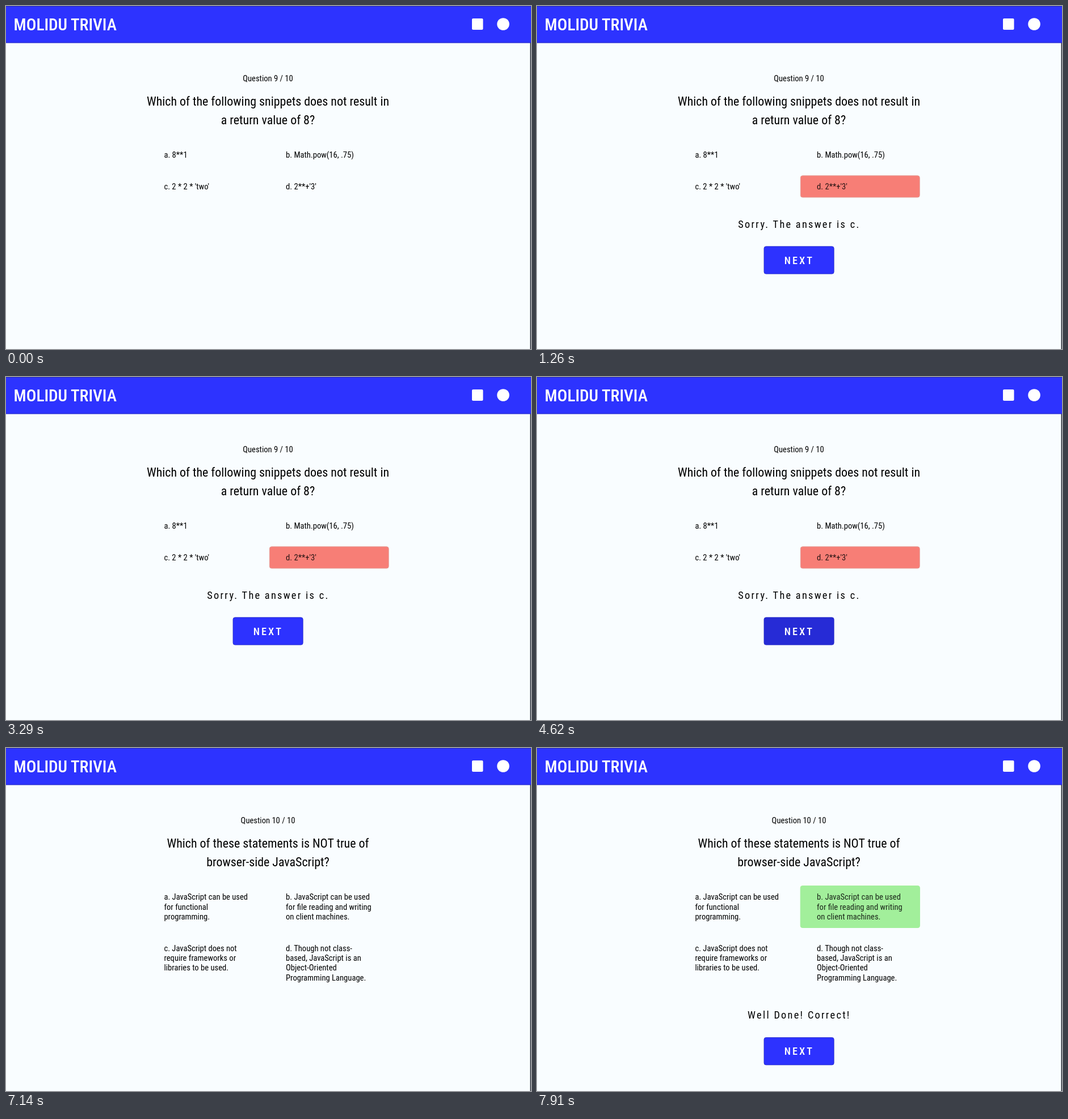
Animation of 925x606 px, one loop 8 s. Source, as an HTML page:

```html
<!DOCTYPE html>
<html lang="en">
<head>
<meta charset="utf-8">
<title>Trivia quiz</title>
<style>
  html, body { margin: 0; width: 100%; height: 100%; overflow: hidden; background: #f9fdff; }
  svg { display: block; width: 100vw; height: 100vh; }
  text { font-family: "Roboto Condensed", Roboto, sans-serif; font-stretch: 75%; white-space: pre; }
</style>
</head>
<body>
<svg id="stage" viewBox="0 0 925 606" xmlns="http://www.w3.org/2000/svg"></svg>
<script>
const LOOP = 8000;
const REM = 14.62;
const LINE = 17.36;
const CENTER = 461.5;
const COLUMNS = [278.4, 493];
const BLUE = [45, 50, 255];
const BLUE_HOVER = [38, 43, 214];
const stage = document.getElementById('stage');

function add(parent, tag, attrs) {
  const node = document.createElementNS('http://www.w3.org/2000/svg', tag);
  for (const key in attrs) node.setAttribute(key, attrs[key]);
  parent.appendChild(node);
  return node;
}

// Condense regular Roboto only where no condensed face is available.
function findSqueeze() {
  const sample = 'Which of the following snippets';
  const measure = style => {
    const node = add(stage, 'text', { 'font-size': 100, style });
    node.textContent = sample;
    const width = node.getComputedTextLength();
    node.remove();
    return width;
  };
  const wide = measure('font-family: Roboto, sans-serif; font-stretch: 100%');
  const k = 0.89 * wide / measure('');
  return k > 0.95 ? 1 : k;
}
const squeeze = findSqueeze();

function label(parent, str, x, y, size, opts = {}) {
  const node = add(parent, 'text', {
    transform: `translate(${x} ${y}) scale(${squeeze} 1)`,
    'font-size': size,
    'font-weight': opts.weight || 400,
    'text-anchor': opts.anchor || 'middle',
    'letter-spacing': (opts.spacing || 0) / squeeze,
    fill: opts.fill || '#000'
  });
  node.textContent = str;
  return node;
}

function makeScene(data) {
  const root = add(stage, 'g', {});
  label(root, data.counter, CENTER, 133.2, REM);
  data.title.forEach((str, i) => label(root, str, CENTER, 175.7 + i * 33, REM * 1.5));

  const [bx, by, bw, bh] = data.box;
  const box = add(root, 'rect', {
    x: bx, y: by, width: bw, height: bh, rx: 3.5, fill: data.color, stroke: data.edge
  });

  const picked = [];
  data.options.forEach((lines, i) => {
    const y = i < 2 ? 268.3 : data.secondRow;
    lines.forEach((str, n) => {
      const node = label(root, str, COLUMNS[i % 2], y + n * LINE, REM, { anchor: 'start' });
      if (i === data.pick) picked.push(node);
    });
  });

  const result = add(root, 'g', {});
  const top = data.resultTop;
  label(result, data.message, CENTER + 0.4, top + 6.6, REM * 1.25, { spacing: 2.3 });
  const button = add(result, 'rect', {
    x: 400, y: top + 39.8, width: 123.2, height: 48.4, rx: 3.5, stroke: '#2429c4', 'stroke-width': 0.8
  });
  label(result, 'NEXT', CENTER + 0.4, top + 70.6, REM * 1.25, { spacing: 3, weight: 500, fill: '#fff' });

  return { root, box, picked, result, button };
}

const first = makeScene({
  counter: 'Question 9 / 10',
  title: ['Which of the following snippets does not result in', 'a return value of 8?'],
  options: [['a. 8**1'], ['b. Math.pow(16, .75)'], ["c. 2 * 2 * 'two'"], ["d. 2**+'3'"]],
  secondRow: 324.1,
  pick: 3,
  box: [464.4, 299.8, 209.8, 38.2],
  color: '#f77e76',
  edge: '#e59a95',
  message: 'Sorry. The answer is c.',
  resultTop: 385
});

const second = makeScene({
  counter: 'Question 10 / 10',
  title: ['Which of these statements is NOT true of', 'browser-side JavaScript?'],
  options: [
    ['a. JavaScript can be used', 'for functional', 'programming.'],
    ['b. JavaScript can be used', 'for file reading and writing', 'on client machines.'],
    ['c. JavaScript does not', 'require frameworks or', 'libraries to be used.'],
    ['d. Though not class-', 'based, JavaScript is an', 'Object-Oriented', 'Programming Language.']
  ],
  secondRow: 358.6,
  pick: 1,
  box: [464.2, 243.5, 210.2, 74],
  color: '#a2ef9b',
  edge: '#a2ef9b',
  message: 'Well Done! Correct!',
  resultTop: 471.7
});

// Window edge and header
add(stage, 'rect', { x: 923.5, y: 65, width: 1.5, height: 541, fill: '#30343e' });
add(stage, 'rect', { width: 925, height: 65, fill: '#2d33ff' });
add(stage, 'rect', { width: 925, height: 1, fill: '#2529b4' });
add(stage, 'rect', { y: 64, width: 925, height: 1.5, fill: '#272cd6' });
label(stage, 'MOLIDU TRIVIA', 13.6, 43, REM * 2, { anchor: 'start', weight: 500, fill: '#fff' });
add(stage, 'rect', { x: 821, y: 22, width: 19.5, height: 20, rx: 2, fill: '#fff' });
add(stage, 'circle', { cx: 876, cy: 32, r: 10.8, fill: '#fff' });

const ramp = (t, start, length) => Math.min(1, Math.max(0, (t - start) / length));
const mix = (a, b, p) => `rgb(${a.map((v, i) => Math.round(v + (b[i] - v) * p))})`;
const show = (node, on) => node.setAttribute('visibility', on ? 'inherit' : 'hidden');

function pose(scene, t, visible, answerAt, hoverAt) {
  scene.root.setAttribute('visibility', visible ? 'visible' : 'hidden');
  const answered = t >= answerAt;
  const fade = answered ? ramp(t, answerAt - 70, 210) : 0;
  show(scene.result, answered);
  scene.box.setAttribute('opacity', fade);
  scene.picked.forEach(node => node.setAttribute('fill-opacity', 1 - 0.16 * fade));
  scene.button.setAttribute('fill', mix(BLUE, BLUE_HOVER, ramp(t, hoverAt, 210)));
}

function update(t) {
  const next = t >= 4690;
  pose(first, t, !next, 1120, 4340);
  pose(second, t, next, 7630, LOOP);
}

const began = performance.now();
function tick() {
  update((performance.now() - began) % LOOP);
  requestAnimationFrame(tick);
}
update(0);
requestAnimationFrame(tick);
</script>
</body>
</html>
```
